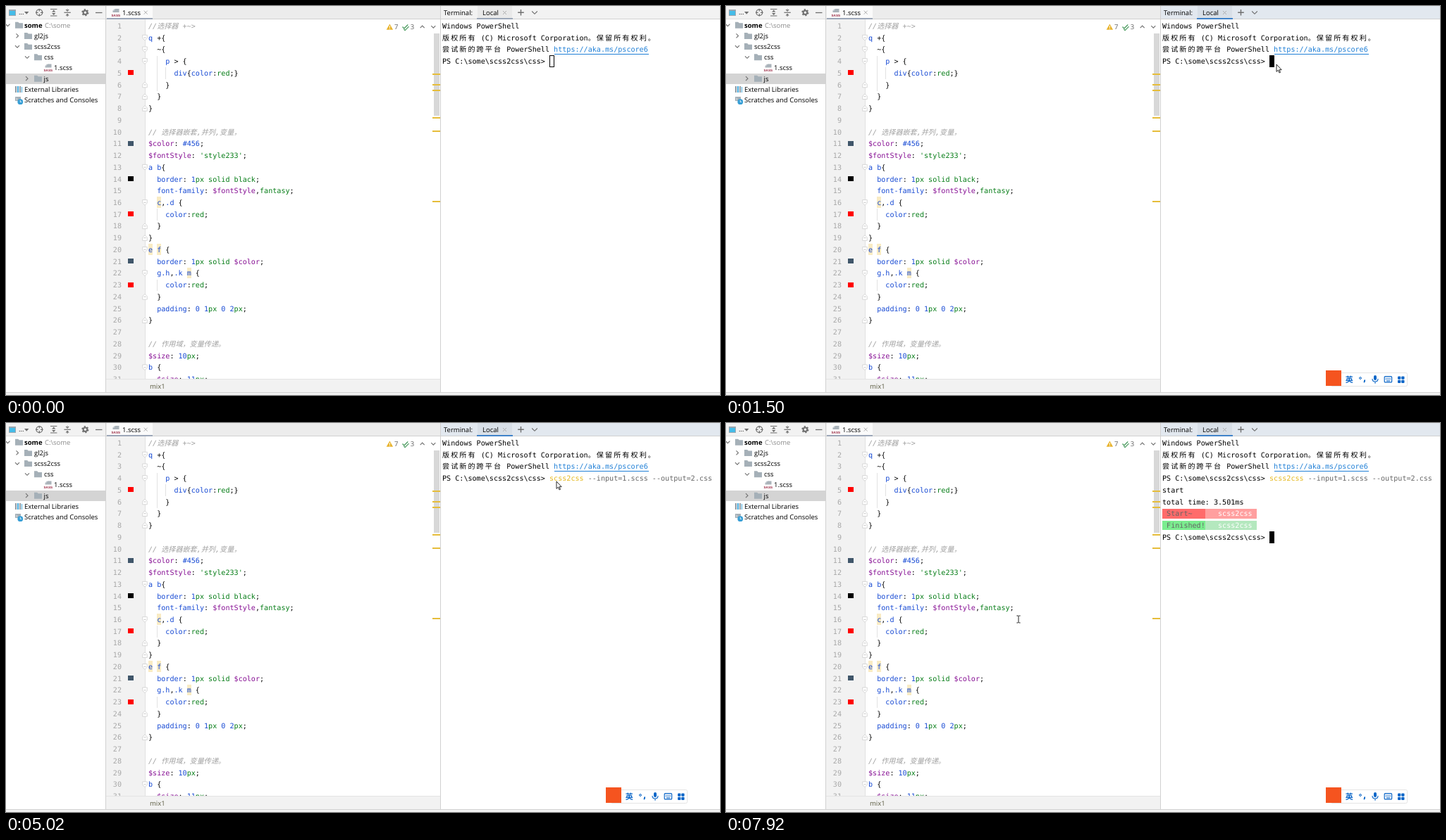
These frames come from a looping animation (1013x553 px, 8000 ms). An HTML page:

```html
<!DOCTYPE html>
<html lang="zh">
<head>
<meta charset="utf-8">
<title>scss2css</title>
<style>
html, body { margin: 0; width: 100%; height: 100%; overflow: hidden; background: #fff; }
svg { display: block; width: 1013px; height: 553px; }
text { white-space: pre; text-rendering: geometricPrecision; }
.mono { font: 10.1px "DejaVu Sans Mono", "Noto Sans CJK SC", "Noto Sans CJK", monospace; }
.ui { font: 9.5px "Open Sans", "Noto Sans", sans-serif; }
.ime { font: bold 11px "Noto Sans CJK SC", "Noto Sans CJK", sans-serif; }
.crisp { shape-rendering: crispEdges; }
</style>
</head>
<body>
<svg id="stage" viewBox="0 0 1013 553"></svg>
<script>
const GREY = '#6e6e6e', LINE = '#d1d1d1', PANEL = '#f2f2f2', BLUE = '#0b66c8', LINK = '#1f7fd6';
const CELL = 6.08, ROW = 16.74, CODE_X = 202, TERM_X = 619;

// Markup helpers
const rect = (x, y, w, h, fill, extra = '') =>
  `<rect class="crisp" x="${x}" y="${y}" width="${w}" height="${h}" fill="${fill}" ${extra}/>`;
const fill = (d, color, extra = '') => `<path d="${d}" fill="${color}" ${extra}/>`;
const line = (d, color = GREY, w = 1.1) =>
  `<path d="${d}" fill="none" stroke="${color}" stroke-width="${w}"/>`;
const text = (x, y, s, color = '#000', cls = 'ui', extra = '') =>
  `<text class="${cls}" x="${x}" y="${y}" fill="${color}" ${extra}>${s}</text>`;
const group = (id, s) => `<g id="${id}">${s}</g>`;
const cross = (x, y) => line(`M${x - 2.5} ${y - 2.5}l5 5m0-5l-5 5`, '#a9a9a9', .9);
const chevron = (x, y, dir, color = GREY, s = 3) => line({
  right: `M${x - s / 2} ${y - s}l${s} ${s}l${-s} ${s}`,
  down: `M${x - s} ${y - s / 2}l${s} ${s}l${s} ${-s}`,
  up: `M${x - s} ${y + s / 2}l${s} ${-s}l${s} ${s}`
}[dir], color);

const folder = (x, y) => fill(`M${x} ${y - 4.5}h4.2l1.5 1.6h5.3v7.4h-11z`, '#a5b0b8');
const sassFile = (x, y) =>
  fill(`M${x + 5} ${y - 5.5}h5.5v5h-9v-1.5z`, '#aab3ba') +
  fill(`M${x + 4} ${y - 5.5}v3h-3z`, '#c3cad0') +
  `<text x="${x - .5}" y="${y + 5}" fill="#9c2b45" style="font:bold 4.6px 'Liberation Sans',sans-serif">SASS</text>`;

function sidebar() {
  const y = i => 27.2 + i * 15.2;
  const label = (x, i, s, color) => text(x, y(i) + 3.3, s, color);
  return rect(0, 0, 141, 19, PANEL) + rect(0, 18, 141, 1, '#dedede') +
    rect(4, 5, 10, 9, '#9aa7b0') + rect(5, 7, 8, 6, '#45bce8') +
    text(18, 12, '...', '#222') + fill('M26 8h6.4l-3.2 3.8z', GREY) +
    `<circle cx="47.3" cy="9.3" r="4.4" fill="none" stroke="${GREY}" stroke-width="1.2"/>` +
    line('M47.3 4v3.6m0 3.4v3.6M42 9.3h3.6m3.4 0h3.6', GREY, 1.2) +
    line('M63 4.5h9.4M63 14h9.4', GREY, 1.2) + fill('M67.7 5.6l2.6 2.8h-5.2zM67.7 12.9l2.6-2.8h-5.2z', GREY) +
    line('M82.4 9.3h9.4', GREY, 1.2) + fill('M87.1 7.9l2.6-2.8h-5.2zM87.1 10.7l2.6 2.8h-5.2zM86.6 4h1v2h-1zM86.6 13h1v2h-1z', GREY) +
    `<circle cx="112.4" cy="9.2" r="2.8" fill="none" stroke="${GREY}" stroke-width="2"/>` +
    `<circle cx="112.4" cy="9.2" r="4.3" fill="none" stroke="${GREY}" stroke-width="1.6" stroke-dasharray="2.2 2.3"/>` +
    line('M127 9.5h9.5', GREY, 1.3) +
    rect(0, 95.5, 141, 15, '#d4d4d4') +
    chevron(2.5, y(0), 'down') + folder(13, y(0)) +
    label(26, 0, 'some', '#000').replace('<text', '<text style="font-weight:bold"') + label(55, 0, 'C:\\some', '#8c8c8c') +
    chevron(16, y(1), 'right') + folder(26, y(1)) + label(40, 1, 'gl2js') +
    chevron(16, y(2), 'down') + folder(26, y(2)) + label(40, 2, 'scss2css') +
    chevron(30, y(3), 'down') + folder(40, y(3)) + label(54, 3, 'css') +
    sassFile(54, y(4)) + label(68, 4, '1.scss') +
    chevron(29.5, y(5), 'right') + folder(40, y(5)) + label(53.5, 5, 'js') +
    rect(13, 114, 2, 9, '#8f9ba4') + rect(16, 114, 2, 9, '#45a9dc') + rect(19, 114, 2, 9, '#8f9ba4') + rect(22, 115, 1, 8, '#45a9dc') +
    label(26, 6, 'External Libraries') +
    fill('M13 129h8v6h-8z', '#a5b0b8') + line('M14.5 131l1.5 1.3l-1.5 1.3', '#fff', .8) +
    '<circle cx="20.3" cy="136.2" r="3.9" fill="#389fd6"/>' + line('M20.3 134v2.4h1.8', '#fff', .8) +
    label(26, 7, 'Scratches and Consoles') + rect(141, 0, 1, 549, LINE);
}

const CODE = `//选择器 +~>
q +{
  ~{
    p > {
      div{color:red;}
    }
  }
}

// 选择器嵌套,并列,变量，
$color: #456;
$fontStyle: 'style233';
a b{
  border: 1px solid black;
  font-family: $fontStyle,fantasy;
  c,.d {
    color:red;
  }
}
e f {
  border: 1px solid $color;
  g.h,.k m {
    color:red;
  }
  padding: 0 1px 0 2px;
}

// 作用域，变量传递。
$size: 10px;
b {
  $size: 11px;`.split('\n');

const TOKEN = /(\/\/.*)|(\$\w+)|('.*?'|px|solid|black|red\b|fantasy)|(#?\d+|\.?[\w-]+)/g;
const paint = s => s.replace(TOKEN, (m, note, variable, value) =>
  note ? `<tspan fill="#a0a0a0" font-style="italic">${m}</tspan>`
    : `<tspan fill="${variable ? '#871094' : value ? '#067d17' : '#174ad4'}">${m}</tspan>`);

function foldMark(y, open) {
  const d = open ? `M193.7 ${y - 3.8}h6.6v4.6l-3.3 3l-3.3-3z` : `M193.7 ${y + 3.8}h6.6v-4.6l-3.3-3l-3.3 3z`;
  return fill(d, '#fff', 'stroke="#cfcfcf" stroke-width=".8"') + line(`M195.3 ${y}h3.4`, '#bdbdbd', .8);
}

function editor() {
  const mid = n => 28.3 + (n - 1) * ROW;
  const col = c => CODE_X + c * CELL;
  const swatches = { 5: '#f00', 11: '#40566a', 14: '#000', 17: '#f00', 21: '#40566a', 23: '#f00' };
  let s = rect(142, 0, 474, 19, '#ececec') + rect(143, 0, 65, 17, '#fafafa') + rect(142, 18, 474, 1, LINE) +
    rect(143, 17, 65, 2, '#9ca7b8') +
    sassFile(150, 9.5) + text(165, 12.6, '1.scss') + cross(198.2, 9.2) +
    rect(142, 19, 55, 511, PANEL) + rect(197, 19, 1, 511, '#e0e0e0');
  for (const [n, c] of [[16, 2], [20, 0], [20, 2], [22, 9]])
    s += rect(col(c), mid(n) - 8, 6.3, 15.5, '#f9ebc3');
  for (const [from, to, c] of [[4, 6, 2], [5, 5, 4], [17, 17, 2], [23, 23, 2]])
    s += rect(Math.round(col(c)), mid(from) - 8, 1, (to - from + 1) * ROW, '#e2e2e2');
  CODE.forEach((src, i) => {
    const n = i + 1, y = mid(n);
    s += text(164, y + 3.6, n, '#a8a8a8', 'mono', 'text-anchor="end"') +
      text(CODE_X, y + 3.6, paint(src), '#080808', 'mono');
    if (swatches[n]) s += rect(173, Math.round(y - 4), 8, 7, swatches[n]);
    if (/\{$/.test(src)) s += foldMark(y, true);
    else if (/^\s*\}$/.test(src)) s += foldMark(y, false);
  });
  s += fill('M544.4 25.6l4.7 8.2h-9.4z', '#e8b32c') + line('M544.4 28.2v2.8m0 .8v1.1', '#fff', 1) +
    text(551, 33.3, '7', '#5e5e5e') +
    line('M562.5 29.5l2.3 2.5l5.5-5.5M564.5 33l1.6 1.6l5.5-5.5', '#4f9e63', 1.3) +
    text(573.7, 33.3, '3', '#5e5e5e') + chevron(590.7, 29.6, 'up') + chevron(606.3, 29.6, 'down') +
    rect(607, 39, 8, 117, '#d8d8d8');
  for (const y of [97, 112, 120, 159, 178, 278]) s += rect(605, y - 1, 11, 2, '#e6bd3a');
  return s + rect(142, 530, 474, 19, PANEL) + rect(142, 530, 474, 1, '#e4e4e4') + text(204, 544, 'mix1', '#5c5c42');
}

const termY = row => 31.9 + row * ROW;
const term = (col, row, s, color = '#000') => text(TERM_X + col * CELL, termY(row), s, color, 'mono');
const wide = (col, row, s) =>
  text(TERM_X + col * CELL, termY(row), s, '#000', 'mono', `letter-spacing="${2 * CELL - 10.1}"`);
const PROMPT = 'PS C:\\some\\scss2css\\css&gt; ';

function badge(row, label, dark, light) {
  const y = 122 + (row - 6) * 16.5;
  return rect(TERM_X, y, 61, 13.6, dark) + rect(TERM_X + 61, y, 73, 13.6, light) +
    term(1, row, label, '#666') + term(13, row, 'scss2css', '#fff');
}

function terminal() {
  return rect(616, 0, 397, 19, PANEL, 'id="head"') + rect(669, 0, 49, 17, '#e9e9e9', 'id="tab"') +
    rect(616, 18, 397, 1, LINE) + rect(668, 17, 51, 2, '#9ca7b8', 'id="mark"') +
    text(621, 12.6, 'Terminal:') + text(676, 12.6, 'Local') + cross(707.5, 9.5) +
    line('M726.2 9.3h8.6M730.5 5v8.6', GREY, 1.4) + chevron(750, 9.4, 'down', GREY, 3.8) +
    rect(616, 0, 1, 549, LINE) +
    term(0, 0, 'Windows PowerShell') + wide(0, 1, '版权所有') + term(9, 1, '(C) Microsoft Corporation') +
    wide(34, 1, '。保留所有权利。') + wide(0, 2, '尝试新的跨平台') + term(15, 2, 'PowerShell') +
    term(26, 2, 'https://aka.ms/pscore6', LINK) + rect(777.5, 68, 134, 1, LINK) +
    term(0, 3, PROMPT) + group('cmd', term(25, 3, 'scss2css', '#e5b81e')) +
    group('args', term(34, 3, '--input=1.scss --output=2.css', '#666')) +
    group('out', term(0, 4, 'start') + term(0, 5, 'total time: 3.501ms') +
      badge(6, 'Start~', '#ff6b6b', '#ff9f9f') + badge(7, 'Finished!', '#7bed8f', '#b4e8be') + term(0, 8, PROMPT)) +
    '<rect id="block" class="crisp" width="6" height="16" stroke="#000" stroke-width="1"/>';
}

function inputBar() {
  let s = '<rect x="858" y="521.5" width="108.5" height="19" rx="2" fill="#fff" stroke="#e4e4e4"/>' +
    rect(851, 518, 22, 22, '#f5541f') + text(878.8, 535.2, '', BLUE, 'ime', 'id="lang"') +
    `<circle cx="900" cy="529" r="1.4" fill="none" stroke="${BLUE}"/>` + line('M905.8 531.5q1 2-.8 3.5', BLUE, 1.8) +
    `<rect x="919" y="525" width="4" height="7" rx="2" fill="${BLUE}"/>` +
    line('M917 530q0 4 4 4t4-4M921 534v2.8', BLUE, 1.1) +
    `<rect x="934.2" y="526.7" width="10.4" height="8.2" rx="1" fill="none" stroke="${BLUE}" stroke-width="1.2"/>` +
    line('M936 529.2h7M936 531h7', BLUE, 1).replace('/>', ' stroke-dasharray="1.2 .8"/>') + line('M937 533h5', BLUE, 1);
  for (const [x, y] of [[953, 526.5], [958.2, 526.5], [953, 531.7], [958.2, 531.7]])
    s += `<rect x="${x}" y="${y}" width="4.3" height="4.3" rx="1" fill="${BLUE}"/>`;
  return s;
}

const stage = document.getElementById('stage');
stage.innerHTML = rect(0, 0, 1013, 553, '#fff') + sidebar() + editor() + terminal() +
  rect(0, 549, 1013, 4, PANEL) + rect(0, 549, 1013, 1, LINE) + group('bar', inputBar()) +
  group('arrow', fill('M0 0v10.4l2.4-2.2l1.7 3.8l1.5-.7l-1.7-3.6h3.3z', '#fff', 'stroke="#111" stroke-width=".9" stroke-linejoin="round"')) +
  group('beam', line('M-2.6-5h2l.6.6l.6-.6h2M-2.6 5h2l.6-.6l.6.6h2M0-4.4v8.8', '#222', 1));

const part = {};
for (const id of ['head', 'tab', 'mark', 'cmd', 'args', 'out', 'block', 'bar', 'lang', 'arrow', 'beam'])
  part[id] = document.getElementById(id);
const show = (node, on) => node.setAttribute('display', on ? 'inline' : 'none');
const set = (node, name, v) => node.setAttribute(name, v);
const mix = (a, b, k) => [a[0] + (b[0] - a[0]) * k, a[1] + (b[1] - a[1]) * k];
const smooth = k => k * k * (3 - 2 * k);
const steps = (t, from, count) => Math.min(count, Math.floor((t - from + 1) / 98 + .03) + 1);

function pointer(t) {
  const rest = [781, 83], near = [788.5, 93.5], left = [258, 258];
  if (t < 100) return null;
  if (t < 980) return mix([905, 230], near, 1 - (1 - steps(t, 100, 9) / 9) ** 1.6);
  if (t < 6920) return mix(near, rest, steps(t, 980, 3) / 3);
  if (t < 7620) return mix(rest, left, smooth(steps(t, 6920, 6) / 6));
  return mix(left, [415, 279], smooth(steps(t, 7620, 4) / 4));
}

const BLINKS = [4030, 4520, 5020, 5510, 6030, 6520];

// Terminal caret as [column, row, visible]
function caret(t) {
  if (t < 2290) return [25, 3, t < 1990];
  if (t < 2690) return [34, 3, true];
  if (t < 3510) return [63, 3, true];
  if (t < 6720) return [0, 4, BLINKS.filter(b => b <= t).length % 2 === 0];
  return [25, 8, t < 7220 || t >= 7720];
}

function draw(now) {
  const t = now % 8000, focus = t >= 1400;
  set(part.head, 'fill', focus ? '#e2e8ef' : PANEL);
  set(part.tab, 'fill', focus ? '#d8dfe7' : '#e9e9e9');
  set(part.mark, 'fill', focus ? '#4083c9' : '#9ca7b8');
  show(part.cmd, t >= 2290);
  show(part.args, t >= 2690);
  show(part.out, t >= 6720);
  show(part.bar, t >= 100);
  part.lang.textContent = t < 1500 ? '中' : '英';

  const [col, row, on] = caret(t);
  show(part.block, on);
  set(part.block, 'x', Math.round(TERM_X + col * CELL) + .5);
  set(part.block, 'y', Math.round(70 + (row - 3) * ROW) + .5);
  set(part.block, 'fill', focus ? '#000' : 'none');

  const p = pointer(t), inEditor = p && p[0] < 605;
  show(part.arrow, p && !inEditor);
  show(part.beam, inEditor);
  if (p) set(inEditor ? part.beam : part.arrow, 'transform', `translate(${Math.round(p[0])} ${Math.round(p[1])})`);
}

const start = performance.now();
function tick() {
  draw(performance.now() - start);
  requestAnimationFrame(tick);
}
tick();
</script>
</body>
</html>
```
